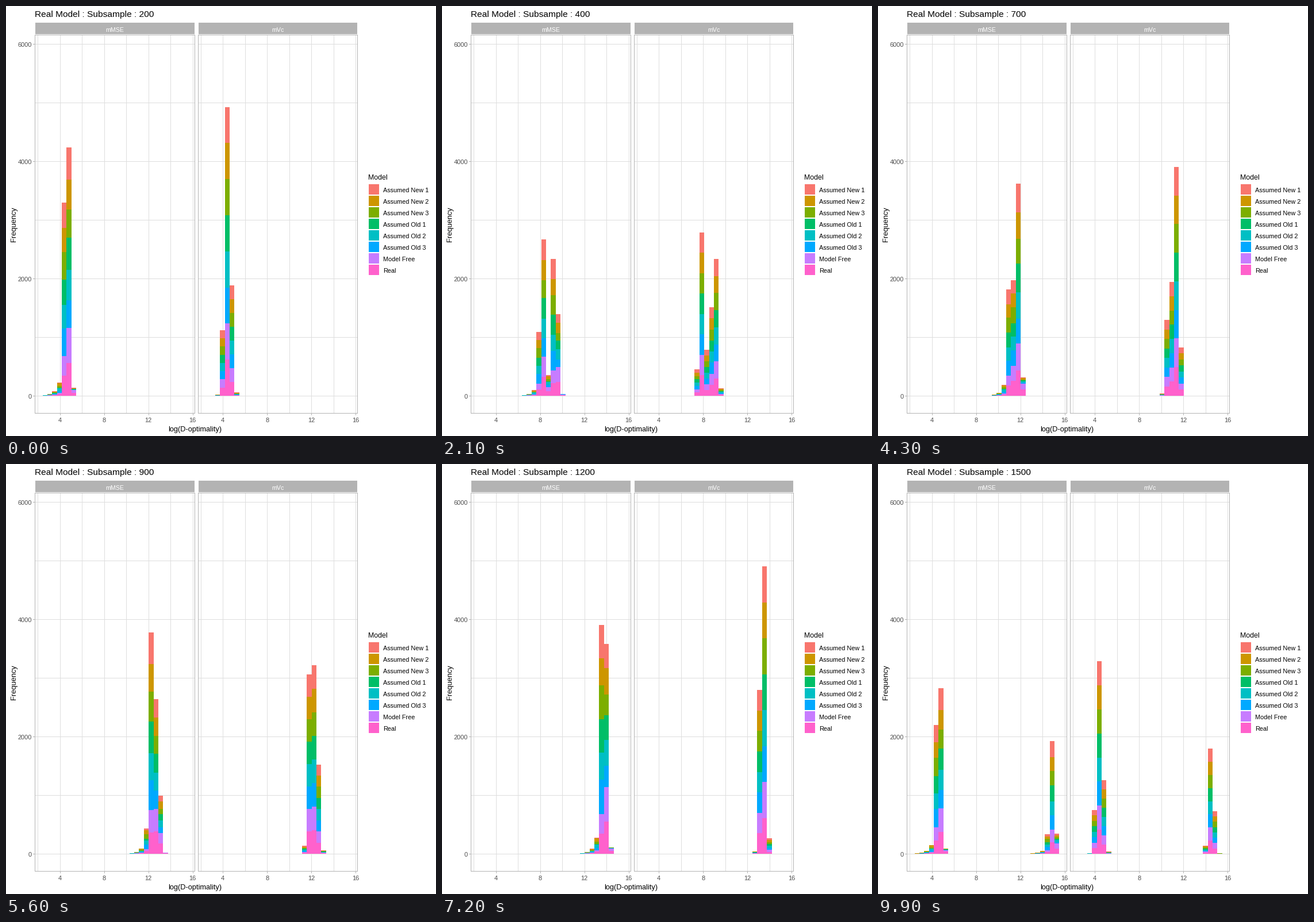
A matplotlib script for the animation above (10000 ms loop, 748 px wide and 748 px high).

```python
import math

import matplotlib.pyplot as plt
import numpy as np
from matplotlib.animation import FuncAnimation
from matplotlib.collections import PolyCollection
from matplotlib.patches import Rectangle

SIZE, DPI = 748, 88
FRAMES, STEP_MS = 100, 100
BINS, REPEATS = 30, 1000

# Colour, then centre shift, spread and left-tail weight in the first panel
MODELS = {
    "Assumed New 1": ("#F8766D", 0.01, 0.36, 0.02),
    "Assumed New 2": ("#CD9600", 0.15, 0.37, 0.22),
    "Assumed New 3": ("#7CAE00", -0.02, 0.40, 0.12),
    "Assumed Old 1": ("#00BE67", 0.01, 0.36, 0.02),
    "Assumed Old 2": ("#00BFC4", 0.15, 0.37, 0.22),
    "Assumed Old 3": ("#00A9FF", -0.02, 0.40, 0.12),
    "Model Free": ("#C77CFF", 0.29, 0.46, 0.07),
    "Real": ("#FF61CC", 0.31, 0.49, 0.12),
}
PANELS = ("mMSE", "mVc")
PANEL_X = ((50, 328), (334, 611))
PANEL_SHIFT = 283.55
TOP, BOTTOM, ZERO_Y, Y_SCALE = 50, 708, 678, 0.102
GRID, FRAME, AXIS_TEXT = "#DEDEDE", "#B3B3B3", "#4D4D4D"

# Subsample sizes and the frame at which each one is reached
STATES = range(200, 1600, 100)
ARRIVE = [0, 7, 15, *range(23, 101, 7)]

# Centre of the distribution, in bins, at a few subsample sizes
KEY_N = np.log([200, 300, 400, 600, 900, 1200, 1400, 1500])
CENTERS = ([5.055, 9.87, 13.21, 17.93, 22.61, 25.925, 27.68, 28.45],
           [4.605, 9.287, 12.58, 17.23, 21.89, 25.17, 26.95, 27.73])


def normal_cdf(z):
    return 0.5 * (1 + math.erf(z / math.sqrt(2)))


def model_counts(n, panel, shift, spread, tail):
    """Histogram of one model: a normal bulk with an exponential left tail."""
    center = np.interp(math.log(n), KEY_N, CENTERS[panel])
    if panel == 0:
        shift *= min(1, math.sqrt(n / 600))
    else:
        shift, spread, tail = 0, 0.45 + 0.115 * (200 / n) ** 2, 0
    below = [(1 - tail) * normal_cdf((k - center - shift) / spread)
             + tail * math.exp(min(k - center, 0)) for k in range(BINS + 1)]
    return REPEATS * np.diff(below)


def stack_levels(n, panel):
    """Stack boundaries from the axis up, one row per boundary."""
    parts = np.array([model_counts(n, panel, *spec[1:])
                      for spec in reversed(MODELS.values())])
    parts[:, parts.sum(axis=0) < 5] = 0
    return np.vstack([np.zeros(BINS), np.cumsum(parts, axis=0)])


LEVELS = [np.array([stack_levels(n, p) for p in range(2)]) for n in STATES]
EDGES = [np.rint(63.5 + PANEL_SHIFT * p + 8.393 * np.arange(BINS + 1))
         for p in range(2)]

plt.rcParams["font.family"] = "Liberation Sans"
fig = plt.figure(figsize=(SIZE / DPI, SIZE / DPI), dpi=DPI, facecolor="white")
ax = fig.add_axes([0, 0, 1, 1])
ax.set_xlim(0, SIZE)
ax.set_ylim(SIZE, 0)
ax.axis("off")


def box(x, y, w, h, color, z=1):
    ax.add_patch(Rectangle((x, y), w, h, facecolor=color, linewidth=0,
                           antialiased=False, snap=False, zorder=z))


def label(x, y, text, px, color="black", ha="left", **kw):
    return ax.text(x, y, text, fontsize=px * 72 / DPI, color=color, ha=ha,
                   va="baseline", zorder=6, **kw)


def draw_panel(p):
    left, right = PANEL_X[p]
    width = right - left + 1
    for i in range(7):
        y = ZERO_Y - 102 * i
        box(left, y, width, 1, GRID)
        if p == 0 and i % 2 == 0:
            box(left - 3, y, 3, 1, FRAME)
            label(45, y + 5, str(1000 * i), 11, AXIS_TEXT, "right")
    for v in range(2, 17, 2):
        x = 93.5 + PANEL_SHIFT * p + 19.27 * (v - 4)
        col = math.floor(x + 0.5)
        box(col, TOP, 1, BOTTOM - TOP, GRID)
        if v % 4 == 0:
            box(col, BOTTOM + 1, 1, 3, FRAME)
            label(x, 724, str(v), 11, AXIS_TEXT, "center")
    for x in (left, right):
        box(x, TOP, 1, BOTTOM - TOP + 1, FRAME, 5)
    for y in (TOP, BOTTOM):
        box(left, y, width, 1, FRAME, 5)
    box(left + 1, 29, width - 2, 20, FRAME, 5)
    label((left + right) / 2, 45, PANELS[p], 10.6, "white", "center")


for p in range(2):
    draw_panel(p)

title = label(50, 19, "", 15.5)
label(329, 740, "log(D-optimality)", 12.7, ha="center")
label(17, 379.5, "Frequency", 12.9, ha="center", rotation=90,
      rotation_mode="anchor")
label(630, 302, "Model", 12.4)
for i, (name, spec) in enumerate(MODELS.items()):
    box(631, 310 + 20 * i, 18, 18, spec[0])
    label(656, 324 + 20 * i, name, 10.9)

bars = []
for spec in reversed(MODELS.values()):
    bar = PolyCollection([], facecolors=spec[0], edgecolors="none",
                         linewidths=0, antialiaseds=False, zorder=3)
    bar.set_snap(False)
    bars.append(ax.add_collection(bar, autolim=False))


def levels_at(frame):
    """Current state and its stacks, blended linearly into the next state."""
    i = max(k for k, start in enumerate(ARRIVE[:-1]) if start <= frame)
    steps = 4 if i < 3 else 3
    t = max(0, (frame - ARRIVE[i + 1] + steps) / steps)
    return i, (1 - t) * LEVELS[i] + t * LEVELS[(i + 1) % len(LEVELS)]


def update(frame):
    i, levels = levels_at(frame)
    title.set_text(f"Real Model : Subsample : {STATES[i]}")
    ys = np.rint(ZERO_Y - Y_SCALE * levels)
    for m, bar in enumerate(bars):
        quads = []
        for p in range(2):
            for k in range(BINS):
                low, high = ys[p, m, k], ys[p, m + 1, k]
                if low > high:
                    a, b = EDGES[p][k], EDGES[p][k + 1]
                    quads.append([(a, low), (b, low), (b, high), (a, high)])
        bar.set_verts(quads)
    return [title, *bars]


anim = FuncAnimation(fig, update, frames=FRAMES, interval=STEP_MS,
                     repeat=True, repeat_delay=0, blit=False)
plt.show()
```
